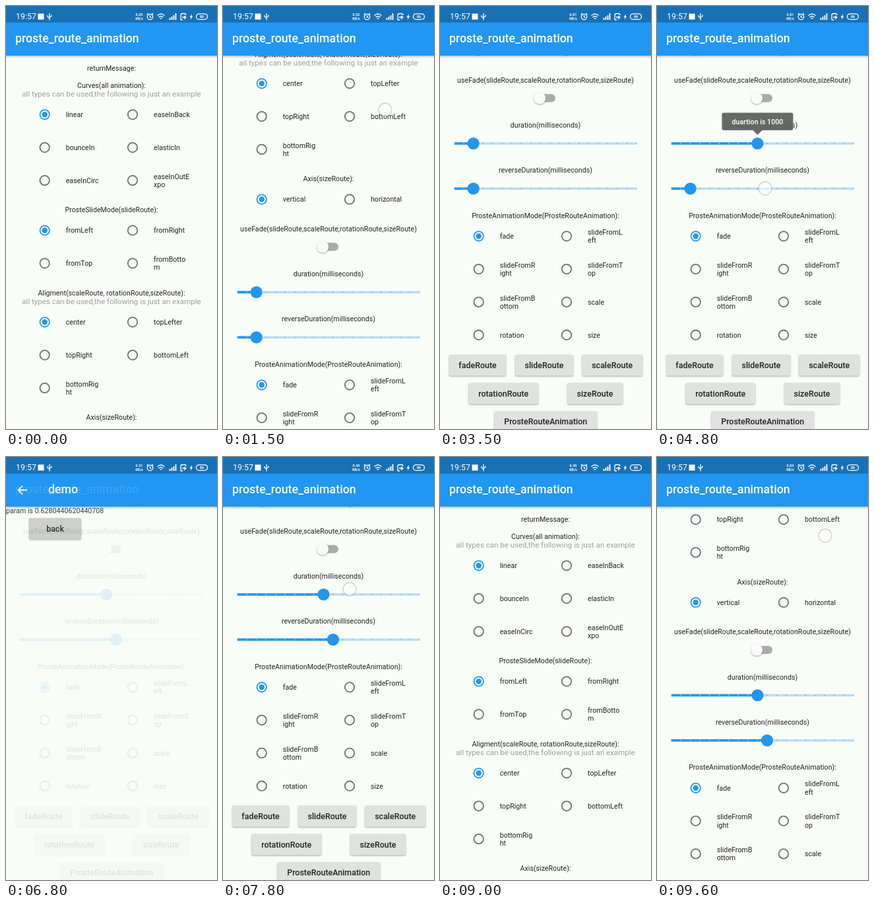
Animation of 320 by 640 pixels, one loop 9.9 s. Source, as an HTML page:

```html
<!DOCTYPE html>
<html>
<head>
<meta charset="utf-8">
<style>
  html, body { margin: 0; width: 100%; height: 100%; overflow: hidden; background: #f9fdf8; }
  svg { display: block; }
  text { font: 10.67px Roboto, sans-serif; fill: #222; white-space: pre; }
  .mid { text-anchor: middle; }
  .note { font-size: 11.56px; fill: #9e9e9e; }
  .title { font-size: 17.78px; font-weight: 500; fill: #fff; }
  .button { font-size: 12.44px; font-weight: 500; }
  .tip { font-weight: 500; fill: #fff; }
  .clock { font-size: 12.4px; fill: #fff; }
  .tiny { font-size: 5.4px; font-weight: 700; fill: #fff; }
  .icon { fill: none; stroke: #fff; stroke-width: 1.3; }
  .raised { filter: drop-shadow(0 1.5px 1.2px rgba(0, 0, 0, .35)); }
</style>
</head>
<body>
<svg id="stage" width="320" height="640" viewBox="0 0 320 640"></svg>
<script>
const LOOP = 9900, STEP = 100, LAST = 9600;
const BLUE = '#2196f3', PAPER = '#f9fdf8';

const label = (x, y, s, cls = '') => `<text x="${x}" y="${y + 3.8}" class="${cls}">${s}</text>`;
const heading = (y, s) => label(160, y, s, 'mid');
const note = y => label(160, y + .2, 'all types can be used,the following is just an example', 'mid note');

// Options run in two columns; "|" marks a wrapped line, the first of a group is selected.
const options = (top, names) => names.split(' ').map((name, i) => {
  const x = i % 2 ? 192 : 58.7, y = top + Math.floor(i / 2) * 49.8, color = i ? '#707370' : BLUE;
  const lines = name.split('|');
  return `<circle cx="${x}" cy="${y}" r="7.2" fill="none" stroke="${color}" stroke-width="1.8"/>` +
    (i ? '' : `<circle cx="${x}" cy="${y}" r="4.2" fill="${BLUE}"/>`) +
    lines.map((s, k) => label(x + 32, y + (k - (lines.length - 1) / 2) * 12.4, s)).join('');
}).join('');

const button = (x, y, w, s) =>
  `<rect class="raised" x="${x}" y="${y - 16}" width="${w}" height="32" rx="2" fill="#dfe2de"/>` +
  label(x + w / 2, y + .6, s, 'mid button');

const bar = `<rect y="74" width="320" height="5" fill="url(#shade)"/><rect width="320" height="75" fill="${BLUE}"/>`;

const sliderX = value => 21.5 + (value - 100) / 100 * 14.55;
function slider(y, value) {
  const x = sliderX(value);
  let ticks = '';
  for (let v = 100; v <= 2000; v += 100) {
    ticks += `<circle cx="${sliderX(v)}" cy="${y}" r=".9" fill="${v < value ? '#fff' : BLUE}" opacity=".55"/>`;
  }
  return `<rect x="21.5" y="${y - 1.8}" width="276.5" height="3.6" fill="${BLUE}" opacity=".3"/>
    <rect x="21.5" y="${y - 1.8}" width="${x - 21.5}" height="3.6" fill="${BLUE}"/>${ticks}
    <circle cx="${x}" cy="${y}" r="9.1" fill="${BLUE}"/>`;
}

function tooltip(y, value, scale) {
  return `<g transform="translate(${sliderX(value)} ${y}) scale(${scale})">
    <path d="M-51 -46.5H51q3 0 3 3V-23q0 3-3 3H7L0 -13L-7 -20H-51q-3 0-3-3V-43.5q0-3 3-3z" fill="#606461" opacity=".96"/>
    ${label(0, -33.3, 'duartion is ' + value, 'mid tip')}</g>`;
}

const form = heading(94, 'returnMessage:') +
  heading(120, 'Curves(all animation):') + note(133) +
  options(164.3, 'linear easeInBack bounceIn elasticIn easeInCirc easeInOutE|xpo') +
  heading(308.3, 'ProsteSlideMode(slideRoute):') +
  options(339.5, 'fromLeft fromRight fromTop fromBotto|m') +
  heading(434, 'Aligment(scaleRoute, rotationRoute,sizeRoute):') + note(447) +
  options(478.3, 'center topLefter topRight bottomLeft bottomRig|ht') +
  heading(622.3, 'Axis(sizeRoute):') +
  options(653.5, 'vertical horizontal') +
  heading(698, 'useFade(slideRoute,scaleRoute,rotationRoute,sizeRoute)') +
  `<rect x="145" y="719.2" width="30" height="12.4" rx="6.2" fill="#a9ada8"/>
   <circle class="raised" cx="151.3" cy="725.4" r="8.9" fill="#fafafa"/>` +
  heading(766.3, 'duration(milliseconds)') +
  heading(834.6, 'reverseDuration(milliseconds)') +
  heading(903, 'ProsteAnimationMode(ProsteRouteAnimation):') +
  options(934.3, 'fade slideFromL|eft slideFromR|ight slideFromT|op slideFromB|ottom scale rotation size') +
  button(14, 1129.5, 86, 'fadeRoute') + button(114, 1129.5, 88, 'slideRoute') + button(215.5, 1129.5, 91.5, 'scaleRoute') +
  button(43.5, 1172.3, 105.5, 'rotationRoute') + button(193, 1172.3, 84, 'sizeRoute') +
  button(82.5, 1215, 155.5, 'ProsteRouteAnimation');

const status = `<rect width="320" height="25" fill="#1870b5"/>
  ${label(15, 16.3, '19:57', 'clock')}
  <rect x="48.5" y="11.5" width="9" height="9" fill="#fff"/>
  <g class="icon">
    <path d="M66 11v10.5M63 14v2.2l3 2M69 13.5v2l-3 1.8"/>
    <circle cx="218.5" cy="16.5" r="4.2"/><path d="M218.5 14v2.7l2 1M213.8 13l2-2M223.2 13l-2-2"/>
    <path d="M229.5 14.5q5.5-5 11 0M231.5 17q3.500-3 7 0M233.500 19.200q1.500-1.200 3 0"/>
    <path d="M248.500 21v-3M251.500 21v-5M254.500 21v-7M257.500 21v-10" stroke-width="1.8"/>
    <path d="M265 21v-7q0-2.500 3-2.500h2q3 0 3 2.500M267 17h6M270 15l3 2-3 3M265 21h3"/>
    <rect x="288.500" y="11.800" width="17" height="8.600" rx="4.300"/>
  </g>
  <path d="M282 12l-3.500 5h2l-.8 4 3.600-5.400h-2z" fill="#fff"/>
  <text class="tiny mid" x="202" y="15" id="speed"></text><text class="tiny mid" x="202" y="21">KB/s</text>
  <text class="tiny mid" x="297" y="18.100">86</text>`;

const stage = document.getElementById('stage');
stage.innerHTML = `<defs><linearGradient id="shade" x2="0" y2="1">
    <stop stop-opacity=".3"/><stop offset="1" stop-opacity="0"/></linearGradient></defs>
  <rect width="320" height="640" fill="${PAPER}"/>
  <g id="scroller">${form}<g id="sliders"></g></g>
  ${bar}${label(14, 51, 'proste_route_animation', 'title')}
  <g id="demo"><rect width="320" height="640" fill="${PAPER}"/>${bar}
    <path class="icon" d="M32 50H19M25 43.500L18.500 50L25 56.500" style="stroke-width:1.8"/>
    ${label(64, 51, 'demo', 'title')}${label(0, 81, 'param is 0.6280440620440708')}
    ${button(35, 108.500, 79, 'back')}
    <rect id="press" x="35" y="92.500" width="79" height="32" rx="2"/></g>
  ${status}
  <circle id="touch" r="10" fill="#fff" fill-opacity=".55" stroke="#777" stroke-opacity=".35" stroke-width="1.300"/>`;
const [scroller, sliders, demo, press, speed, touch] =
  ['scroller', 'sliders', 'demo', 'press', 'speed', 'touch'].map(id => document.getElementById(id));

// Linear interpolation over [time, value] points.
function track(points, t) {
  const i = points.findIndex(p => p[0] > t);
  if (i < 0) return points[points.length - 1][1];
  if (!i) return points[0][1];
  const [t0, a] = points[i - 1], [t1, b] = points[i];
  return a + (b - a) * (t - t0) / (t1 - t0);
}

const scrollPath = [[1100, 0], [1500, 361], [1700, 515], [1900, 587], [2400, 587], [2500, 586], [7800, 586],
  [8000, 486], [8200, 310], [8300, 271], [8500, 101], [8700, 20], [8900, 0], [9150, 0], [9600, 433.5]];
const fadePath = [[5550, 0], [6550, 1], [6670, 1], [7770, 0]];
const pressPath = [[6500, 0], [6700, .12], [6900, .1], [7200, 0]];
// start, end, from x, y, to x, y
const gestures = [
  [1100, 1500, 226, 518, 246, 157], [2100, 2300, 196, 420, 188, 301],
  [4300, 4500, 153, 208, 153, 208], [4800, 4850, 164, 276, 164, 276],
  [5400, 5500, 57, 543, 57, 543], [6500, 6600, 56, 109, 56, 109],
  [7800, 8000, 192, 200, 200, 300], [8300, 8500, 208, 200, 217, 370],
  [9150, 9600, 238, 552, 255, 119]];
const speeds = [[0, '0.03'], [1200, '0.32'], [3500, '0.01'], [5500, '0.31'], [7700, '0.45'], [9100, '0.04']];

function render(now) {
  const t = Math.min(LAST, Math.floor(now % LOOP / STEP) * STEP);
  scroller.setAttribute('transform', `translate(0 ${-track(scrollPath, t)})`);

  const pop = start => track([[start, 0], [start + 100, 1], [start + 600, 1], [start + 700, 0]], t);
  sliders.innerHTML = slider(794, t < 4300 ? 300 : 1000) + slider(862.3, t < 4900 ? 300 : 1100) +
    tooltip(794, 1000, pop(4300)) + tooltip(862.3, 1100, pop(4850));

  demo.setAttribute('opacity', track(fadePath, t));
  press.setAttribute('opacity', track(pressPath, t));
  speed.textContent = speeds.filter(s => s[0] <= t).pop()[1];

  const g = gestures.find(g => t >= g[0] && t <= g[1]);
  touch.setAttribute('visibility', g ? 'visible' : 'hidden');
  if (g) {
    const k = (t - g[0]) / (g[1] - g[0]);
    touch.setAttribute('cx', g[2] + (g[4] - g[2]) * k);
    touch.setAttribute('cy', g[3] + (g[5] - g[3]) * k);
  }
}

const begin = performance.now();
(function tick() {
  render(performance.now() - begin);
  requestAnimationFrame(tick);
})();
</script>
</body>
</html>
```
